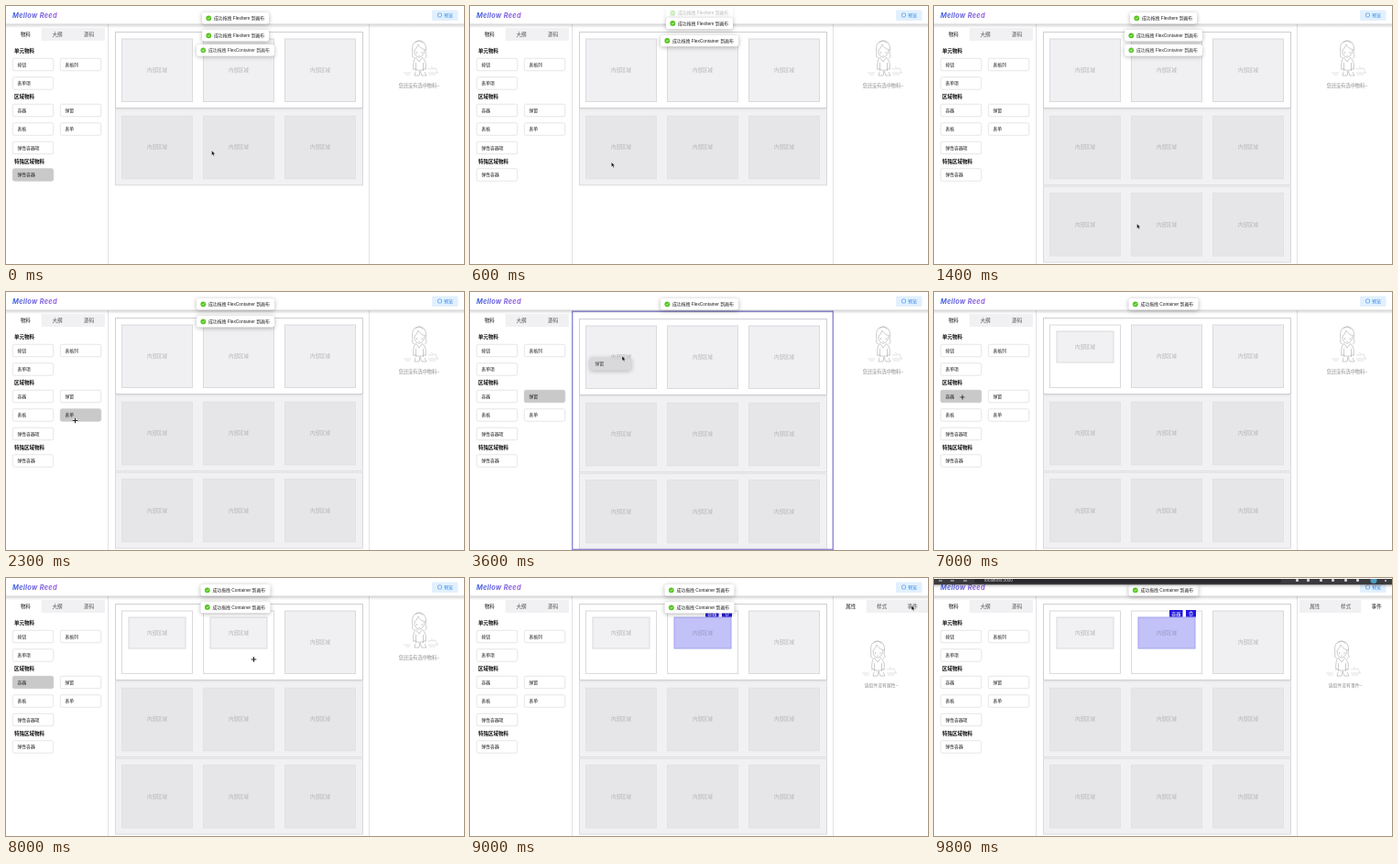
An HTML page that plays this animation: 500 px wide and 282 px high, repeating every 10000 ms.

```html
<!DOCTYPE html>
<html lang="zh-CN">
<head>
<meta charset="utf-8">
<title>Page builder</title>
<style>
html, body { margin: 0; width: 100%; height: 100%; overflow: hidden; background: #fff; }
svg { display: block; width: 100vw; height: 100vh; font-family: "Liberation Sans", "Noto Sans CJK SC", "Noto Sans CJK", sans-serif; }
.soft { filter: drop-shadow(0 1px 2.5px rgba(0, 0, 0, .3)); }
.logo { font: italic 700 7.4px Inter, sans-serif; letter-spacing: .28px; }
</style>
</head>
<body>
<svg id="stage" viewBox="0 0 500 282"></svg>
<script>
const stage = document.getElementById('stage');
const LOOP = 10000, STEP = 100;

// time, x, y, pointer shape (a = arrow, m = move)
const path = [
  [0, 224.5, 158, 'a'], [100, 224, 158, 'a'], [400, 216, 164, 'a'], [500, 216, 164, 'a'],
  [800, 31, 184, 'm'], [900, 31, 184, 'a'], [1300, 222, 240, 'a'], [1400, 221.5, 238, 'a'],
  [1600, 31, 181, 'm'], [2200, 75.5, 140, 'm'], [2300, 75.5, 140.5, 'm'], [2500, 74, 129, 'm'],
  [2700, 74, 129, 'm'], [3300, 82, 115, 'm'], [3500, 82, 115, 'a'], [3600, 166, 70, 'a'],
  [3700, 82, 115, 'm'], [3800, 82, 115, 'm'], [4300, 70, 130, 'm'], [4900, 38, 116, 'm'],
  [5100, 31, 116, 'a'], [5500, 150, 80, 'a'], [5600, 31, 116, 'm'], [6000, 31, 116, 'm'],
  [6100, 31, 116, 'a'], [6500, 176, 76, 'm'], [6600, 176, 76, 'm'], [6800, 31, 115, 'm'],
  [7100, 31, 115, 'a'], [7700, 264, 80, 'm'], [8000, 270.5, 89, 'm'], [8200, 268, 80, 'm'],
  [8300, 268, 80, 'm'], [8600, 254, 64, 'a'], [8700, 254, 64, 'a'], [9000, 482, 30, 'a'],
  [9100, 482, 30, 'a'], [9400, 420, -10, 'a']
];
// start, end, label, ghost offset from the pointer
const drags = [
  [1000, 1300, '弹性容器', -24, -7], [3600, 3700, '弹窗', -35, 1.5],
  [5200, 5600, '容器', -24, -9], [6200, 6500, '容器', -24, -9], [7300, 7700, '容器', -24, -8]
];
const pressed = [
  [0, 200, '弹性容器'], [900, 1400, '弹性容器'], [2200, 2500, '表单'],
  [3300, 4100, '弹窗'], [5100, 6700, '容器'], [7000, 8100, '容器']
];
// start, end, component, box width
const toasts = [
  [-1500, 600, 'FlexItem', 73], [-1300, 1700, 'FlexItem', 73],
  [-100, 2900, 'FlexContainer', 85], [1300, 4300, 'FlexContainer', 85],
  [6500, 9500, 'Container', 76], [7800, 10800, 'Container', 76]
];
const palette = [
  ['按钮', 7, 57], ['表格列', 59, 57], ['表单项', 7, 77.5], ['容器', 7, 107], ['弹窗', 59, 107],
  ['表格', 7, 127.5], ['表单', 59, 127.5], ['弹性容器项', 7, 148], ['弹性容器', 7, 177.5]
];

const active = t => ([from, to]) => t >= from && t < to;
const clamp = v => Math.max(0, Math.min(1, v));
const ease = v => 1 - (1 - clamp(v)) ** 3;
const rect = (x, y, w, h, fill, more = '') =>
  `<rect x="${x}" y="${y}" width="${w}" height="${h}" fill="${fill}" ${more}/>`;
const text = (s, x, y, size, fill = '#333', more = '') =>
  `<text x="${x}" y="${y + size * .37}" font-size="${size}" fill="${fill}" ${more}>${s}</text>`;
const label = (s, x, y, size, fill) => text(s, x, y, size, fill, 'text-anchor="middle"');
const line = (d, stroke, width) =>
  `<path d="${d}" fill="none" stroke="${stroke}" stroke-width="${width}"/>`;
const box = (x, y, w, h, fill, stroke) => rect(x + .5, y + .5, w - 1, h - 1, fill, `stroke="${stroke}"`);
const group = (s, x, y, more = '') => `<g transform="translate(${x} ${y})" ${more}>${s}</g>`;

function tabs(x, width, names, current) {
  const w = width / 3;
  return rect(x, 24, width, 14, '#f1f1f3') + rect(x + current * w, 24, w, 14, '#fff') +
    names.map((n, i) => label(n, x + (i + .5) * w, 31, 5.6, i === current ? '#222' : '#555')).join('');
}

function sidebar(t) {
  const down = pressed.filter(active(t)).map(p => p[2]);
  const heads = [['单元物料', 49], ['区域物料', 99], ['特殊区域物料', 170]];
  return line('M111.5 20V282M396.5 20V282', '#e2e2e4', 1) +
    tabs(4, 104, ['物料', '大纲', '源码'], 0) +
    heads.map(([s, y]) => text(s, 9, y, 5.5, '#111', 'font-weight="700"')).join('') +
    palette.map(([s, x, y]) => {
      const on = down.includes(s);
      return rect(x + .25, y + .25, 44.5, 13.5, on ? '#c9c9c9' : '#fff',
        `rx="2" stroke="${on ? '#c9c9c9' : '#dcdcde'}" stroke-width=".7"`) +
        text(s, x + 5.5, y + 7, 4.8, '#222');
    }).join('');
}

function canvas(t) {
  const rows = t < 1300 ? 2 : 3, chosen = t >= 8600;
  let out = '';
  for (let r = 0; r < rows; r++) {
    const y = 28 + r * 84.3;
    out += box(119, y, 271, 84, r ? '#f1f1f3' : '#fff', r ? '#dadadd' : '#cfcfd2');
    for (let c = 0; c < 3; c++) {
      const x = 126 + c * 89, filled = !r && (c === 0 && t >= 6500 || c === 1 && t >= 7700);
      const on = filled && c === 1 && chosen;
      out += box(x, y + 7.5, 78, 69.5, filled ? '#fff' : r ? '#e6e6e8' : '#f0f0f3', r ? '#e2e2e4' : '#dadade');
      if (filled) out += box(x + 7.5, y + 14.5, 63, 35, on ? '#c2c2f8' : '#f1f1f3', on ? '#a3a3ee' : '#dadade');
      out += label('内部区域', x + 39, y + (filled ? 32 : 42), 5.5, on ? '#9898c4' : '#b4b4b8');
    }
  }
  if (chosen) {
    out += rect(257, 35, 14.5, 7.5, '#2418dc') + label('容器', 264.2, 38.8, 5, '#fff') +
      rect(275, 35, 11, 7.5, '#2418dc') +
      line('M278.7 37.5h3.8M279.3 38v3h2.6v-3M280 36.7h1.3', '#fff', .6);
  }
  const drag = drags.some(active(t));
  return group(out, 0, drag ? 1 : 0) +
    (drag ? rect(111.7, 21.2, 284.6, 260.2, 'none', 'stroke="#8d88d6" stroke-width="1.4"') : '');
}

function sketch(x, y) {
  const hair = 'M10 15C8 5 12 1 17 1s9 4 7 14M12 11c2-1 3-4 4-6 2 4 5 5 8 6M10 15c-1 3 0 4 2 5M24 15c2 3 1 4-1 5M13 3c3-3 7-2 8 1';
  const face = 'M12 11c0 5 2 8 5 8s5-3 6-8M14.5 13v2M20 13v2M16.5 17h1.5';
  const body = 'M14 19c-3 2-4 8-3 14M20 19c4 3 5 8 4 14M14 20l3 4 3-4M13.5 25v9M21.5 25v9M11 31c4 3 9 3 13 0M13 35l-1 4h5l1-5 2 5h5l-2-4';
  const ground = 'M0 36h8M27 36h11M2 38h5M28 38h7M27 32l8-1 2 5M30 29l2 2';
  return group(line(hair + face + body, '#a8a8a8', .6) + line(ground, '#c6c6c6', .5), x, y);
}

function inspector(t) {
  if (t < 8600) return sketch(434, 37) + label('您还没有选中物料~', 451, 87, 5.2, '#8c8c8c');
  const last = t >= 9100;
  return tabs(399, 101, ['属性', '样式', '事件'], last ? 2 : 0) + sketch(428, 68) +
    label(`该组件没有${last ? '事件' : '属性'}~`, 449, 117, 4.9, '#8c8c8c');
}

function header() {
  return rect(0, 19, 500, 5, 'url(#shade)') + rect(0, 0, 500, 19.5, '#fff') +
    '<text class="logo" x="7" y="13" fill="url(#ink)">Mellow Reed</text>' +
    rect(465, 4.5, 28.5, 11.5, '#e2f0fe', 'rx="1.5"') +
    rect(471.5, 8, 4, 4, 'none', 'rx="1" stroke="#4295ee" stroke-width=".7"') +
    text('预览', 478, 10.2, 5.1, '#2f88e8');
}

function messages(t) {
  const gone = to => ease((t - to + 100) / 300);
  return toasts.map(([from, to, name, w], i) => {
    const enter = ease((t - from) / 300), leave = gone(to);
    if (t < from || leave >= 1) return '';
    // earlier messages hold a slot until they have slid away
    const slot = toasts.slice(0, i).reduce((n, m) => n + 1 - gone(m[1]), 0);
    const y = 7 + slot * 19 - 10 * (1 - enter) - 8 * leave;
    const mark = '<circle cx="7.3" cy="6.3" r="2.9" fill="#52c41a"/>' + line('M6 6.3l1 1 1.7-2', '#fff', .7);
    return group(rect(0, 0, w, 12.6, '#fff', 'rx="2.5" class="soft"') + mark +
      text(`成功拖拽 ${name} 到画布`, 13, 6.3, 4.85, '#222'), 250.5 - w / 2, y,
      `opacity="${Math.min(.6 + .4 * enter, 1 - leave)}"`);
  }).join('');
}

function browserBar(t) {
  const shown = clamp((t - 9200) / 300);
  if (!shown) return '';
  const icons = [395, 407, 421, 434, 448, 461].map(x => rect(x, 1, 3, 3, '#d0d0d2', 'rx="1"')).join('');
  return group(rect(0, 7, 500, 4, 'url(#shade)') + rect(0, 1, 500, 6.3, '#3b3b3d') +
    line('M5 3h4M18 3h4M32 3h4', '#d0d0d2', 1) + rect(44, 1, 335, 4.5, '#29292b', 'rx="2"') +
    text('localhost:3000', 55, 2, 4.8, '#d6d6d8') + icons +
    '<circle cx="480" cy="2.5" r="3.5" fill="#4d9ac4"/><circle cx="493" cy="3" r="1" fill="#d0d0d2"/>' +
    rect(0, -2, 500, 3, '#fff'), 0, -7 * (1 - shown));
}

function pointer(t) {
  const i = path.findLastIndex(p => p[0] <= t), a = path[i], b = path[i + 1] || a;
  const k = b === a ? 0 : (t - a[0]) / (b[0] - a[0]);
  const x = a[1] + (b[1] - a[1]) * k, y = a[2] + (b[2] - a[2]) * k;
  const drag = drags.find(active(t));
  const ghost = drag ? group(rect(0, 0, 45, 14, '#d5d5d7', 'rx="2" class="soft"') +
    text(drag[2], 5.5, 6.5, 4.8, '#222'), x + drag[3], y + drag[4], 'opacity=".85"') : '';
  const cross = 'M-2.8 0H2.8M0-2.8V2.8';
  const shape = a[3] === 'm' && !drag
    ? line(cross, '#fff', 2.2) + line(cross, '#222', 1.1)
    : '<path d="M0 0v5.2l1.2-1 .9 1.9 1-.5-.9-1.8h1.7z" fill="#111" stroke="#fff" stroke-width=".4"/>';
  return ghost + group(shape, x, y);
}

const defs = `<defs>
<linearGradient id="ink"><stop stop-color="#4967df"/><stop offset="1" stop-color="#9a5fe0"/></linearGradient>
<linearGradient id="shade" x2="0" y2="1"><stop stop-color="#000" stop-opacity=".2"/><stop offset="1" stop-color="#000" stop-opacity="0"/></linearGradient>
</defs>`;

let drawn = -1;
function frame() {
  const t = Math.floor(performance.now() % LOOP / STEP) * STEP;
  if (t !== drawn) {
    drawn = t;
    stage.innerHTML = defs + rect(0, 0, 500, 282, '#fff') + sidebar(t) + canvas(t) + inspector(t) +
      header() + messages(t) + browserBar(t) + pointer(t);
  }
  requestAnimationFrame(frame);
}
frame();
</script>
</body>
</html>
```
